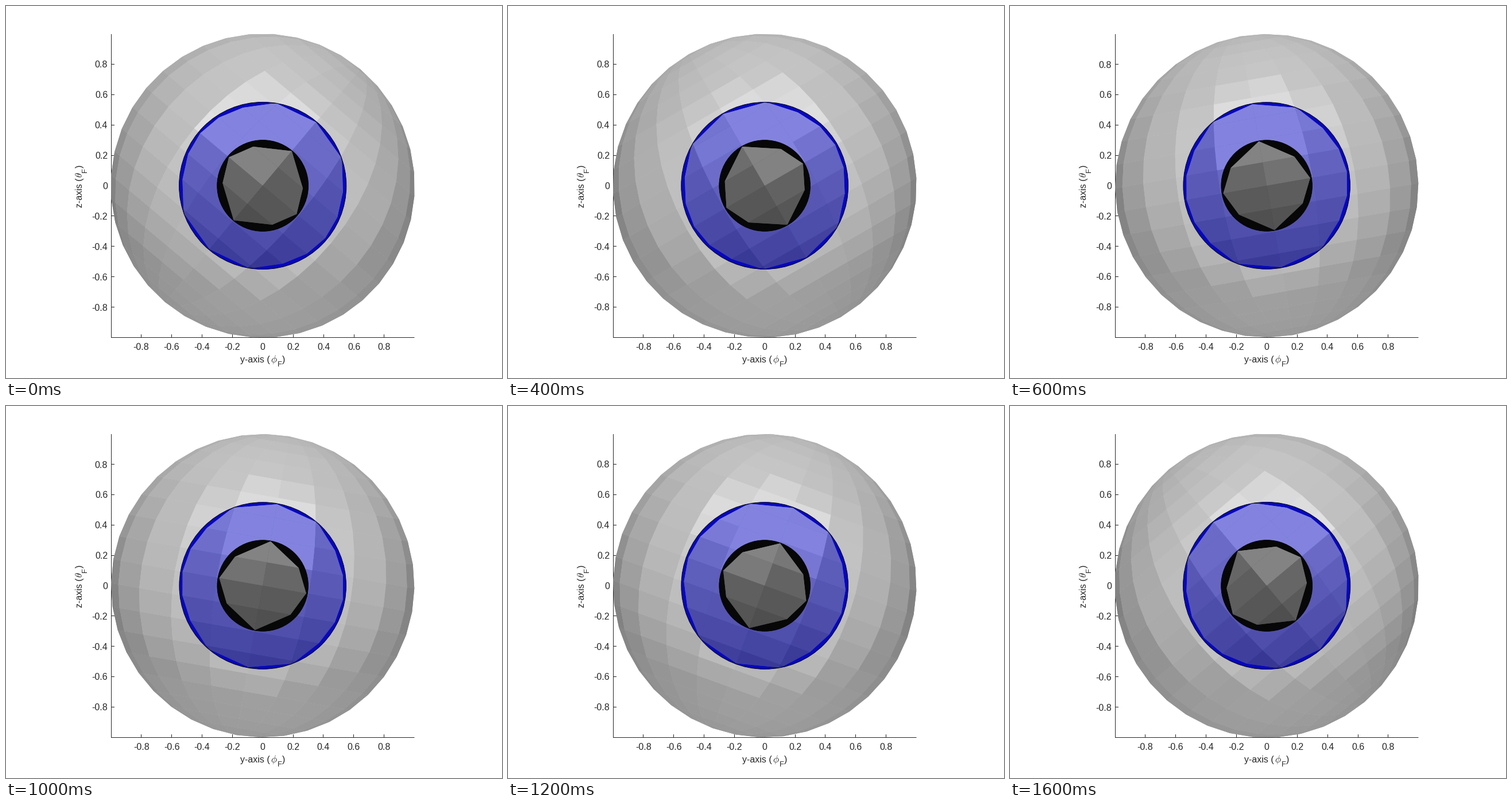
These frames come from a looping animation (864x648 px, 1800 ms). A matplotlib script:

```python
import numpy as np
import matplotlib.pyplot as plt
from matplotlib.animation import FuncAnimation
from matplotlib.collections import PolyCollection
from matplotlib.patches import Circle

W, H = 864, 648
CX, CY, HALF = 447.2, 313.0, 264.1
LEFT, BOTTOM, TOP, RIGHT = 183.5, 577.5, 49, 711.5
INK = "#262626"
TORSION = [-40, 20, 30, 10, 0, -10, -20, -30, 40]  # degrees, counterclockwise
LIGHT = np.array([1, 0, 1]) / np.sqrt(2)
ALPHA = 0.5

plt.rcParams["font.family"] = "Liberation Sans"
plt.rcParams["mathtext.fontset"] = "cm"

fig = plt.figure(figsize=(W / 72, H / 72), dpi=72, facecolor="white")
ax = fig.add_axes([0, 0, 1, 1])
ax.set_xlim(0, W)
ax.set_ylim(H, 0)
ax.axis("off")


def tone(n, color=1.0):
    """Phong shading of a surface with normal n, seen along +x."""
    d = n @ LIGHT
    spec = 0.9 * max(2 * d * n[0] - LIGHT[0], 0) ** 10 if d > 0 else 0
    return np.clip((0.3 + 0.6 * max(d, 0)) * np.asarray(color) + spec, 0, 1)


def sphere_point(lat, lon):
    lat, lon = np.radians([lat, lon])
    return np.array([np.cos(lat) * np.cos(lon), np.cos(lat) * np.sin(lon), np.sin(lat)])


def front_quads():
    return [np.array([sphere_point(a, b), sphere_point(a, b + 18),
                      sphere_point(a + 9, b + 18), sphere_point(a + 9, b)])
            for a in range(-90, 90, 9) for b in range(-90, 90, 18)]


def roll(pts, deg):
    c, s = np.cos(np.radians(deg)), np.sin(np.radians(deg))
    x, y, z = pts.T
    return np.stack([x, y * c - z * s, y * s + z * c], axis=1)


def clip_front(pts, depth):
    """Part of a polygon nearer to the viewer than the plane x = depth."""
    out = []
    for p, q in zip(pts, np.roll(pts, -1, axis=0)):
        if p[0] >= depth:
            out.append(p)
        if (p[0] >= depth) != (q[0] >= depth):
            out.append(p + (q - p) * (depth - p[0]) / (q[0] - p[0]))
    return np.array(out)


def normal(quad):
    n = np.cross(quad[2] - quad[0], quad[3] - quad[1])
    return n / np.linalg.norm(n)


QUADS = front_quads()
FACING = np.array([1.0, 0, 0])
DISCS = [(0.55, tone(FACING, [0, 0, 1])), (0.30, tone(FACING, [0, 0, 0]))]


def add_facets(polys, colors, scale, z):
    flat = [np.stack([CX + scale * p[:, 1], CY - scale * p[:, 2]], axis=1) for p in polys]
    # a second pass hides the antialiasing seams between facets
    return [ax.add_collection(PolyCollection(flat, facecolors=colors, edgecolors="none",
                                             linewidths=0, zorder=z), autolim=False)
            for _ in range(2)]


def add_eye(deg, scale):
    quads = [roll(q, deg) for q in QUADS]
    normals = [normal(q) for q in quads]
    front = [tone(n) for n in normals]
    back = [tone(n * [1, -1, -1]) for n in normals]
    shell = [(ALPHA * f + (1 - ALPHA) * (ALPHA * b + 1 - ALPHA)) * np.ones(3)
             for f, b in zip(front, back)]
    arts = add_facets(quads, shell, scale, 2)
    for i, (radius, color) in enumerate(DISCS):
        z = 3 + 2 * i
        arts.append(ax.add_patch(Circle((CX, CY), radius * scale, facecolor=color,
                                        edgecolor="black", linewidth=0.9, zorder=z)))
        depth = np.sqrt(1 - radius ** 2)
        polys, colors = [], []
        for q, f in zip(quads, front):
            part = clip_front(q, depth)
            if len(part) > 2:
                polys.append(part)
                colors.append(ALPHA * f + (1 - ALPHA) * color)
        arts += add_facets(polys, colors, scale, z + 1)
    return arts


def add_line(x, y):
    return ax.plot(x, y, color=INK, lw=1, snap=False, zorder=1,
                   solid_capstyle="butt")[0]


def add_ticks(limit, scale):
    arts = []
    for v in np.arange(-5, 6) / 5:
        if abs(v) > limit + 1e-9:
            continue
        x, y = CX + v * scale, CY - v * scale
        px, py = np.floor(x) + 0.5, np.floor(y) + 0.5
        arts.append(add_line([px, px], [BOTTOM, BOTTOM - 5.5]))
        arts.append(add_line([LEFT, LEFT + 5.5], [py, py]))
        label = f"{v:g}"
        arts.append(ax.text(x, 598.8, label, size=16, color=INK, ha="center"))
        arts.append(ax.text(177.2, y + 5.9, label, size=16, color=INK, ha="right"))
    return arts


def add_label(x, y, pieces, vertical=False):
    """Pieces are (text, offset along the line, drop below the baseline, size)."""
    for text, along, drop, size in pieces:
        pos = (x + drop, y - along) if vertical else (x + along, y + drop)
        ax.text(*pos, text, size=size, color=INK, ha="left", va="baseline",
                rotation=90 if vertical else 0, rotation_mode="anchor")


add_line([LEFT, LEFT], [TOP, BOTTOM + 0.5])
add_line([LEFT - 0.5, RIGHT], [BOTTOM, BOTTOM])
add_label(408, 620.5, [("y-axis (", 0, 0, 16), (r"$\phi$", 53, 0, 17),
                       ("F", 65, 8, 13), (")", 73, 0, 16)])
add_label(133, 351, [("z-axis (", 0, 0, 16), (r"$\theta$", 52, 0, 17),
                     ("F", 61.5, 8, 13), (")", 69.5, 0, 16)], vertical=True)

live = []


def update(i):
    while live:
        live.pop().remove()
    deg = TORSION[i]
    # the axes stay tight around the rotated 40-sided outline
    limit = np.cos(np.radians(deg - 9 * np.arange(-20, 20))).max()
    scale = HALF / limit
    live.extend(add_ticks(limit, scale) + add_eye(deg, scale))
    return live


anim = FuncAnimation(fig, update, frames=len(TORSION), interval=200,
                     repeat=True, repeat_delay=0, blit=False)
plt.show()
```
